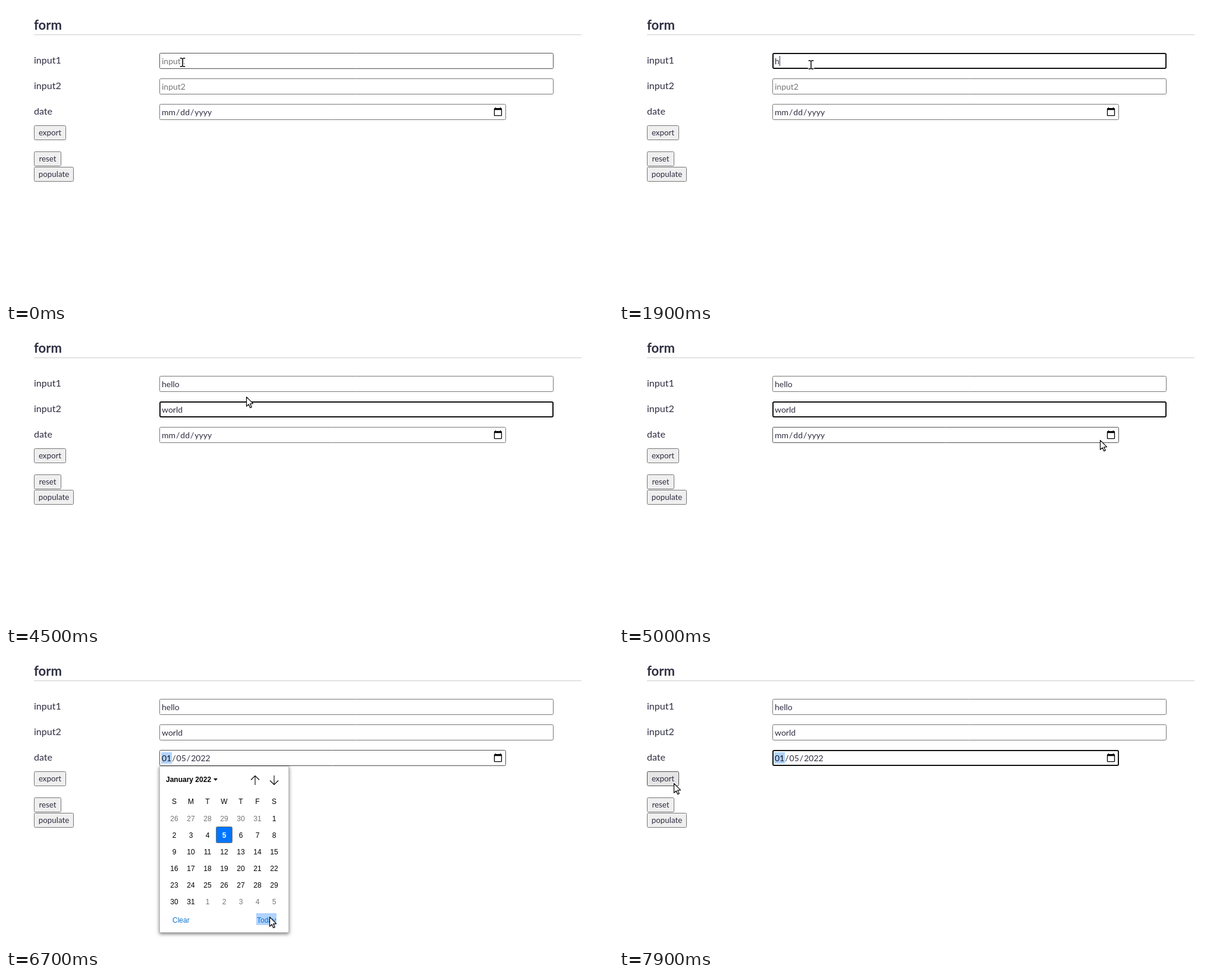
These frames come from a looping animation (1021 px wide and 497 px high, 8 s). An HTML page with a canvas:

```html
<!DOCTYPE html>
<html lang="en">
<head>
<meta charset="utf-8">
<title>form</title>
<style>
html, body { margin: 0; width: 100%; height: 100%; overflow: hidden; background: #fff; }
canvas { display: block; }
</style>
</head>
<body>
<canvas id="stage" width="1021" height="497"></canvas>
<script>
const ctx = document.getElementById('stage').getContext('2d');
const LOOP = 8000, STEP = 100;
const LATO = 'Lato, sans-serif';
const SANS = '"Liberation Sans", Arial, sans-serif';
const INK = '#2e2e42', GREY = '#757575', RING = '#101010', MARK = '#b0d3ff';

const OPEN = 5400, PICK = 6700, CLOSE = 6800;
const fields = [
  { x: 258, y: 79, w: 663, h: 27, hint: 'input1', word: 'hello',
    focus: [1100, 2800], keys: [1900, 2000, 2100, 2200, 2400] },
  { x: 258, y: 122, w: 663, h: 27, hint: 'input2', word: 'world',
    focus: [2800, OPEN], keys: [3200, 3500, 3600, 3700, 3900] }
];
const dateBox = { x: 258, y: 165, w: 583, h: 27 };
const buttons = [
  { x: 47, y: 201, w: 54, h: 25, label: 'export' },
  { x: 47, y: 245, w: 46, h: 25, label: 'reset' },
  { x: 47, y: 271, w: 67, h: 25, label: 'populate' }
];
// time, x, y of the pointer
const path = [
  [100, 297, 95], [600, 197, 112], [1000, 323, 99], [4400, 323, 99],
  [5000, 809, 187], [5300, 826, 180], [5400, 822, 181], [5800, 636, 272],
  [6500, 443, 446], [6700, 443, 446], [7100, 309, 322], [7900, 92, 221]
];
const calendarIcon = new Path2D('M20 3h-1V1h-2v2H7V1H5v2H4c-1.1 0-2 .9-2 2v16c0 1.1.9 2 2 2h16c1.1 0 2-.9 2-2V5c0-1.1-.9-2-2-2zm0 18H4V8h16v13z');
const arrowShape = new Path2D('M.5 .5V16.3L4.2 12.9L6.8 18.7L9.2 17.6L6.7 12L11.6 11.6Z');
const beamShape = new Path2D('M-3.5 -7H-1.5L0 -6L1.5 -7H3.5M0 -6V6M-3.5 7H-1.5L0 6L1.5 7H3.5');

function text(str, x, y, font, color = INK, align = 'left') {
  ctx.font = font;
  ctx.fillStyle = color;
  ctx.textAlign = align;
  ctx.fillText(str, x, y);
}

function width(str, font) {
  ctx.font = font;
  return ctx.measureText(str).width;
}

function rect(x, y, w, h, color) {
  ctx.fillStyle = color;
  ctx.fillRect(x, y, w, h);
}

function frame(b, line, stroke, fill) {
  ctx.beginPath();
  ctx.roundRect(b.x + line / 2, b.y + line / 2, b.w - line, b.h - line, 2);
  if (fill) {
    ctx.fillStyle = fill;
    ctx.fill();
  }
  ctx.lineWidth = line;
  ctx.strokeStyle = stroke;
  ctx.stroke();
}

function inputFrame(b, focused, hovered) {
  if (focused) frame(b, 2, RING, '#fff');
  else frame(b, 1, hovered ? '#4f4f4f' : '#767676', '#fff');
}

function inside(b, p) {
  return p.x >= b.x && p.x < b.x + b.w && p.y >= b.y && p.y < b.y + b.h;
}

function pointerAt(t) {
  const i = path.findIndex(k => k[0] > t);
  if (i === 0) return { x: path[0][1], y: path[0][2] };
  if (i < 0) return { x: path.at(-1)[1], y: path.at(-1)[2] };
  const [t0, x0, y0] = path[i - 1], [t1, x1, y1] = path[i];
  const k = (t - t0) / (t1 - t0);
  return { x: Math.round(x0 + (x1 - x0) * k), y: Math.round(y0 + (y1 - y0) * k) };
}

function drawField(f, t, mouse) {
  const font = '14px ' + LATO;
  const focused = t >= f.focus[0] && t < f.focus[1];
  inputFrame(f, focused, inside(f, mouse));
  const typed = f.word.slice(0, f.keys.filter(k => k <= t).length);
  text(typed || f.hint, f.x + 4, f.y + 19, font, typed ? INK : GREY);
  if (!focused) return;
  const last = Math.max(f.focus[0], ...f.keys.filter(k => k <= t));
  // the caret restarts its blink at every key
  if (Math.floor((t - last) / 600) % 2 === 0) {
    rect(Math.round(f.x + 4 + width(typed, font)), f.y + 5, 1, 17, INK);
  }
}

function drawDate(t, mouse) {
  const font = '14px ' + LATO;
  const open = t >= OPEN && t < CLOSE;
  inputFrame(dateBox, t >= CLOSE, open || inside(dateBox, mouse));
  const parts = t >= PICK ? ['01', '05', '2022'] : ['mm', 'dd', 'yyyy'];
  let x = 261;
  parts.forEach((part, i) => {
    const w = width(part, font) + 2;
    if (i === 0 && t >= OPEN) rect(x, 169, Math.round(w), 19, MARK);
    text(part, x + 1, 184, font, i === 0 && t >= OPEN ? '#10101c' : INK);
    x += w;
    if (i < 2) {
      text('/', x, 184, font);
      x += width('/', font);
    }
  });
  ctx.save();
  ctx.translate(819.5, 170);
  ctx.scale(2 / 3, 2 / 3);
  ctx.fillStyle = '#000';
  ctx.fill(calendarIcon, 'evenodd');
  ctx.restore();
}

function drawArrow(x, dir) {
  const tip = 216 - 7.5 * dir;
  ctx.beginPath();
  ctx.moveTo(x, 216 + 8 * dir);
  ctx.lineTo(x, tip);
  ctx.moveTo(x - 7, tip + 7 * dir);
  ctx.lineTo(x, tip);
  ctx.lineTo(x + 7, tip + 7 * dir);
  ctx.lineWidth = 1.1;
  ctx.strokeStyle = '#000';
  ctx.stroke();
}

function drawCalendar(picked) {
  const font = '12px ' + SANS, bold = 'bold 12px ' + SANS;
  ctx.save();
  ctx.shadowColor = 'rgba(0,0,0,.55)';
  ctx.shadowBlur = 6;
  ctx.shadowOffsetY = 2;
  rect(258, 192, 218, 281, '#bfbfbf');
  ctx.restore();
  rect(259, 193, 216, 279, '#fff');

  text('January 2022', 269, 219, bold, '#000');
  ctx.beginPath();
  ctx.moveTo(349, 213);
  ctx.lineTo(356, 213);
  ctx.lineTo(352.5, 217);
  ctx.fill();
  drawArrow(419, 1);
  drawArrow(451, -1);

  [...'SMTWTFS'].forEach((d, i) => text(d, 283 + 28 * i, 256, font, '#000', 'center'));
  for (let i = 0; i < 42; i++) {
    const n = i - 5;
    const x = 283 + 28 * (i % 7), y = 285 + 28 * Math.floor(i / 7);
    if (n === 5) {
      const cell = { x: x - 14, y: y - 19, w: 28, h: 28 };
      if (picked) frame(cell, 1, '#767676', '#0075ff');
      else frame(cell, 2, RING, '#0075ff');
      text(n, x, y, bold, '#fff', 'center');
    } else {
      const out = n < 1 || n > 31;
      text((n + 30) % 31 + 1, x, y, font, out ? GREY : '#000', 'center');
    }
  }
  if (picked) rect(421, 440, 34, 20, MARK);
  text('Clear', 280, 456, font, '#0d73d0');
  text('Today', 422, 456, font, '#0d73d0');
}

function drawPointer(p, beam) {
  ctx.save();
  ctx.translate(p.x, p.y);
  ctx.lineJoin = 'round';
  if (beam) {
    ctx.lineCap = 'square';
    ctx.strokeStyle = '#fff';
    ctx.lineWidth = 3.4;
    ctx.stroke(beamShape);
    ctx.strokeStyle = '#000';
    ctx.lineWidth = 1.5;
    ctx.stroke(beamShape);
  } else {
    ctx.fillStyle = '#fff';
    ctx.strokeStyle = '#111';
    ctx.lineWidth = 1.3;
    ctx.fill(arrowShape);
    ctx.stroke(arrowShape);
  }
  ctx.restore();
}

function draw(now) {
  const t = Math.floor(now % LOOP / STEP) * STEP;
  const mouse = pointerAt(t);
  const open = t >= OPEN && t < CLOSE;
  rect(0, 0, 1021, 497, '#fff');

  text('form', 47, 40, 'bold 22px ' + LATO);
  rect(47, 48, 921, 1, '#ccc');
  ['input1', 'input2', 'date'].forEach((s, i) => text(s, 47, 97 + 43 * i, '16px ' + LATO));

  fields.forEach(f => drawField(f, t, mouse));
  drawDate(t, mouse);
  for (const b of buttons) {
    const hot = inside(b, mouse);
    frame(b, 1, hot ? '#4f4f4f' : '#767676', hot ? '#e5e5e5' : '#efefef');
    text(b.label, b.x + b.w / 2, b.y + 17, '13.333px ' + LATO, INK, 'center');
  }
  if (open) drawCalendar(t >= PICK);
  drawPointer(mouse, !open && fields.some(f => inside(f, mouse)));
}

let start;
function tick(now) {
  start ??= now;
  draw(now - start);
  requestAnimationFrame(tick);
}
requestAnimationFrame(tick);
</script>
</body>
</html>
```
